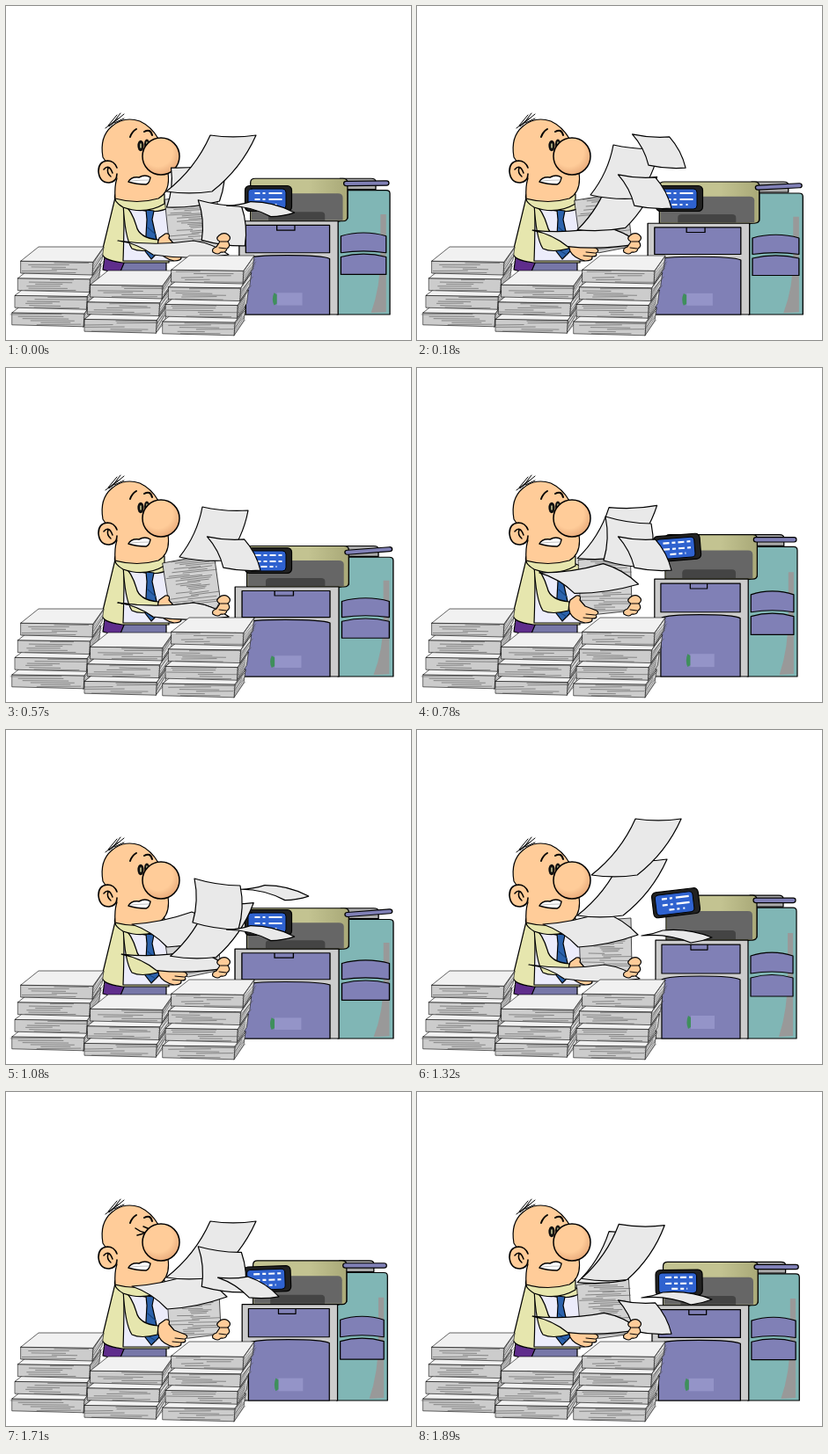
Animation of 460x380 px, one loop 1920 ms. Source, as an HTML page:

```html
<!DOCTYPE html>
<html lang="en">
<head>
<meta charset="utf-8">
<title>Copier chaos</title>
<style>
html, body { margin: 0; width: 100%; height: 100%; overflow: hidden; background: #fff; }
svg { display: block; }
</style>
</head>
<body>
<svg width="460" height="380" viewBox="0 0 460 380" stroke="#000" stroke-width="1.2" stroke-linejoin="round" stroke-linecap="round" fill="none">
  <defs>
    <radialGradient id="noseFill" cx=".42" cy=".38" r=".65">
      <stop offset=".6" stop-color="#ffcc99"/><stop offset="1" stop-color="#e8aa7a"/>
    </radialGradient>
    <linearGradient id="lid"><stop offset=".6" stop-color="#c3c391"/><stop offset="1" stop-color="#a9a978"/></linearGradient>
  </defs>

  <g id="copier">
    <path fill="#aaa" d="M378 188H411Q416 188 416 192V201H378Z"/>
    <path fill="#80b6b5" d="M386 202H427Q431 202 431 206V351H375V240L386 236Z"/>
    <path fill="#999" stroke="none" d="M421 231H427V348L411 349Q421 318 421 280Z"/>
    <path fill="#8080b6" d="M379 257Q390 253 403 253T427 257V277Q403 273 379 277ZM379 282Q403 275 427 282V303H379Z"/>
    <path fill="url(#lid)" d="M283 239V193Q283 188 288 188H381Q386 188 386 193V234Q386 239 381 239Z"/>
    <path fill="#666" stroke="none" d="M284 206H376Q381 206 381 211V238H284Z"/>
    <path fill="#444" stroke="none" d="M302 238V232Q302 228 306 228H358Q362 228 362 232V238Z"/>
    <path fill="#ccc" d="M271 239H376V351H271Z"/>
    <path fill="#8080b6" d="M278 244H367V277H278ZM278 284Q285 280 322 280T367 284V351H278ZM311 244H330V250H311Z"/>
    <path fill="#9494c8" stroke="none" d="M311 325H338V340H311Z"/>
    <path fill="#3f8f5c" stroke="none" d="M308 325L311 327V338L308 340Q305 333 308 325Z"/>
    <rect id="tray" x="382" y="191" width="48" height="5.5" rx="2.700" fill="#8080b6"/>
  </g>

  <g id="display">
    <rect x="-26" y="-14.500" width="53" height="29" rx="5" fill="#222"/>
    <rect x="-22.500" y="-11" width="43" height="23" rx="4" fill="#2f62cf" stroke-width="1"/>
    <path id="readout" stroke="#fff" stroke-width="2.200" stroke-linecap="butt" d="M-15-6H16M-15 1H16M-8 7H10"/>
  </g>

  <g id="man">
    <path fill="#5f2d8c" d="M112 286L110 300L125 304H180V288Z"/>
    <path fill="#7777a8" d="M135 290H182V302H130Z"/>
    <path fill="#e6e6ae" d="M124 218Q119 239 109 280Q108 289 132 292H185V225L160 214Z"/>
    <path fill="#ececfb" d="M134 226Q134 266 133 290H190V227Q168 241 134 226Z"/>
    <path fill="#2c62ac" d="M159 232L168 233L166 243L174 279L165 288L158 279L160 243Z"/>
    <path d="M161 252L170 260M159 265L172 272M159 276L170 283" stroke="#174580"/>
    <path fill="#e6e6ae" d="M133 224Q143 233 148 250Q151 264 173 266L172 276Q153 281 143 276Q135 264 133 224Z"/>
    <path fill="#e6e6ae" d="M124 214Q121 222 133 229Q158 238 180 225L180 214Z"/>
    <path fill="#ffcc99" d="M110 172Q106 149 120 137Q134 125 152 131Q165 137 173 151L184 190Q187 211 173 219Q149 226 124 219Q123 205 126 196Z"/>
    <path fill="#ffcc99" stroke-width="1.600" d="M126 184Q123 176 115 176Q105 177 105 188Q106 201 117 201Q126 200 126 191"/>
    <path d="M111 186Q117 179 121 190M116 184Q114 190 119 194" stroke-width="1.500"/>
    <path d="M113 139L127 128M117 137L134 123M116 136L126 124M120 135L130 122M123 133L134 128" stroke-width="1"/>
    <path d="M141 149Q143 143 148 140M157 143Q164 139 166 147" stroke-width="2"/>
    <g id="openEyes" fill="#111" stroke="none">
      <ellipse cx="153" cy="159" rx="3.600" ry="6.200"/>
      <ellipse cx="160" cy="157" rx="3" ry="5.500"/>
      <path d="M153 157v4M160 155v4" stroke="#c3c391" stroke-width="1.600"/>
    </g>
    <path id="shutEyes" d="M147 155Q152 159 158 160M149 163Q154 162 158 160M156 153L163 156" stroke-width="1.500"/>
    <circle cx="176" cy="171" r="21" fill="url(#noseFill)" stroke-width="1.500"/>
    <path fill="#fff" stroke-width="1.500" d="M139 200Q142 194 151 195Q158 191 164 195Q163 202 159 203Q148 203 139 200Z"/>
    <path d="M141 199Q152 198 163 198" stroke="#999" stroke-width=".600"/>
  </g>

  <g id="heldStack"></g>
  <path fill="#ffcc99" d="M174 264L181 259Q187 258 185 264L191 271L204 276Q208 279 203 281Q206 285 199 285Q200 290 191 290Q178 287 174 279Q171 271 174 264Z"/>
  <path d="M192 280L202 281M189 284L199 285" stroke-width="1"/>
  <g id="sheets" fill="#e9e9e9"></g>
  <path fill="#ffcc99" d="M242 261Q247 257 252 260Q257 264 252 268Q256 273 251 276Q250 281 244 280Q241 284 235 280Q233 276 239 274L243 268Q237 265 242 261Z"/>
  <path d="M244 268L252 268M242 275L250 276" stroke-width="1"/>
  <g id="piles"></g>
</svg>

<script>
const STEP = 30, LOOP = 32, BOUNCE = 16;
const byId = id => document.getElementById(id);
const mix = (a, b, k) => a + (b - a) * k;
const smooth = k => { k = Math.min(1, Math.max(0, k)); return k * k * (3 - 2 * k); };

let seed = 7;
const random = () => (seed = (seed * 16807) % 2147483647) / 2147483647;
const between = (a, b) => mix(a, b, random());

function addPath(parent, d, attributes = {}) {
  const path = document.createElementNS("http://www.w3.org/2000/svg", "path");
  path.setAttribute("d", d);
  for (const name in attributes) path.setAttribute(name, attributes[name]);
  parent.appendChild(path);
  return path;
}

// Ragged strokes that suggest sheet edges.
function hatch(parent, x, y, width, height, count) {
  let d = "";
  for (let i = 0; i < count; i++) {
    const left = x + between(-2, width * .5);
    const right = Math.min(x + width + 2, left + between(width * .3, width * .75));
    const row = y + (i + .5) * height / count;
    d += `M${left} ${row}L${right} ${row + between(-.6, .8)}`;
  }
  addPath(parent, d, { stroke: "#555", "stroke-width": .6 });
}

function block(x, y) {
  const g = byId("piles"), thin = { "stroke-width": .6 };
  addPath(g, `M${x + 82} ${y + 17}L${x + 94} ${y}L${x + 92} ${y + 15}L${x + 81} ${y + 32}Z`, { fill: "#ddd", ...thin });
  addPath(g, `M${x} ${y + 16}L${x + 82} ${y + 17}L${x + 81} ${y + 32}L${x} ${y + 30}Z`, { fill: "#ccc", ...thin });
  addPath(g, `M${x} ${y + 16}L${x + 20} ${y}L${x + 94} ${y}L${x + 82} ${y + 17}Z`, { fill: "#f1f1f1", ...thin });
  hatch(g, x, y + 17, 81, 14, 6);
  let side = "";
  for (let k = 2; k < 15; k += 2.5) side += `M${x + 81} ${y + 17 + k}L${x + between(90, 96)} ${y + k}`;
  addPath(g, side, { stroke: "#555", ...thin });
}

function pile(x, y, count) {
  for (let i = count - 1; i >= 0; i--) block(x - 3.3 * i, y + 19.6 * i);
}
pile(17, 274, 4);
pile(96, 301, 3);
pile(188, 284, 4);

const held = byId("heldStack");
addPath(held, "M184 218L243 214L244 268L238 277L206 280L186 272Z", { fill: "#d2d2d2", "stroke-width": .7 });
hatch(held, 185, 217, 57, 60, 30);

// Every sheet passes these stations: time, centre, half width vector, half length vector.
const stations = [
  { at: 0, x: 295, y: 235, wx: 12, wy: -3, lx: 28, ly: 4 },
  { at: 5, x: 239, y: 198, wx: 26, wy: 4, lx: -1, ly: 25 },
  { at: 9, x: 233, y: 179, wx: 26, wy: 0, lx: -25, ly: 32 },
  { at: 13, x: 197, y: 227, wx: 34, wy: -7, lx: 20, ly: 13 },
  { at: 16, x: 190, y: 275, wx: 43, wy: 0, lx: 20, ly: 8 }
];

function poseAt(age, lift) {
  const next = Math.max(1, stations.findIndex(s => s.at >= age));
  const a = stations[next - 1], b = stations[next];
  const k = smooth((age - a.at) / (b.at - a.at)), pose = {};
  for (const key in a) pose[key] = mix(a[key], b[key], k);
  const rise = lift * (1 - smooth((age - 9) / 4));
  pose.x += Math.max(0, rise) * .35;
  pose.y -= rise;
  return pose;
}

// Width edges sag, length edges bow sideways.
function sheetPath({ x, y, wx, wy, lx, ly }) {
  const corner = (w, l) => [x + w * wx + l * lx, y + w * wy + l * ly];
  const curve = ([ax, ay], [bx, by], dx, dy) =>
    `Q${(ax + bx) / 2 + dx} ${(ay + by) / 2 + dy} ${bx} ${by}`;
  const [a, b, c, d] = [corner(-1, -1), corner(1, -1), corner(1, 1), corner(-1, 1)];
  const sag = Math.abs(wx) * .15, bowX = ly * .25, bowY = -lx * .25;
  return `M${a}` + curve(a, b, 0, sag) + curve(b, c, bowX, bowY) + curve(c, d, 0, sag) + curve(d, a, bowX, bowY) + "Z";
}

const sheets = [
  { launch: 12 }, { launch: 16 }, { launch: 21 }, { launch: 23 },
  { launch: 28, lift: -45 }, { launch: 31 }, { launch: 35 }, { launch: 35, lift: 46 }
].map(({ launch, lift = 0 }) => ({ launch, lift, path: addPath(byId("sheets"), "") }));

const show = (id, visible) => byId(id).setAttribute("visibility", visible ? "visible" : "hidden");
const wave = (frame, peak) => Math.cos(2 * Math.PI * (frame - peak) / BOUNCE);

function draw(time) {
  const frame = Math.floor(time / STEP) % LOOP;
  const squash = .5 + .5 * wave(frame, 3.7);
  const hop = Math.max(0, wave(frame, 11.7)) ** 1.8;

  byId("copier").setAttribute("transform",
    `translate(359 351) scale(${1 + .125 * squash} ${1 - .091 * squash}) translate(-359 -351)`);
  byId("tray").setAttribute("transform", `rotate(${-11 * Math.max(0, squash - .5)} 408 194)`);
  byId("display").setAttribute("transform",
    `translate(${297.5 - 4 * hop} ${219 - 22.5 * hop}) rotate(${-7 * hop})`);
  byId("readout").setAttribute("stroke-dasharray", frame < LOOP / 2 ? "6 3 3 4 15 3" : "7 3 4 3");
  held.setAttribute("transform", `rotate(${-7 * squash} 214 270)`);

  const blink = frame >= 23 && frame <= 25;
  show("openEyes", !blink);
  show("shutEyes", blink);

  for (const { launch, lift, path } of sheets) {
    const age = (frame - launch + 2 * LOOP) % LOOP;
    path.setAttribute("d", age <= 16 ? sheetPath(poseAt(age, lift)) : "");
  }
}

const start = performance.now();
function tick() {
  draw(performance.now() - start);
  requestAnimationFrame(tick);
}
tick();
</script>
</body>
</html>
```
